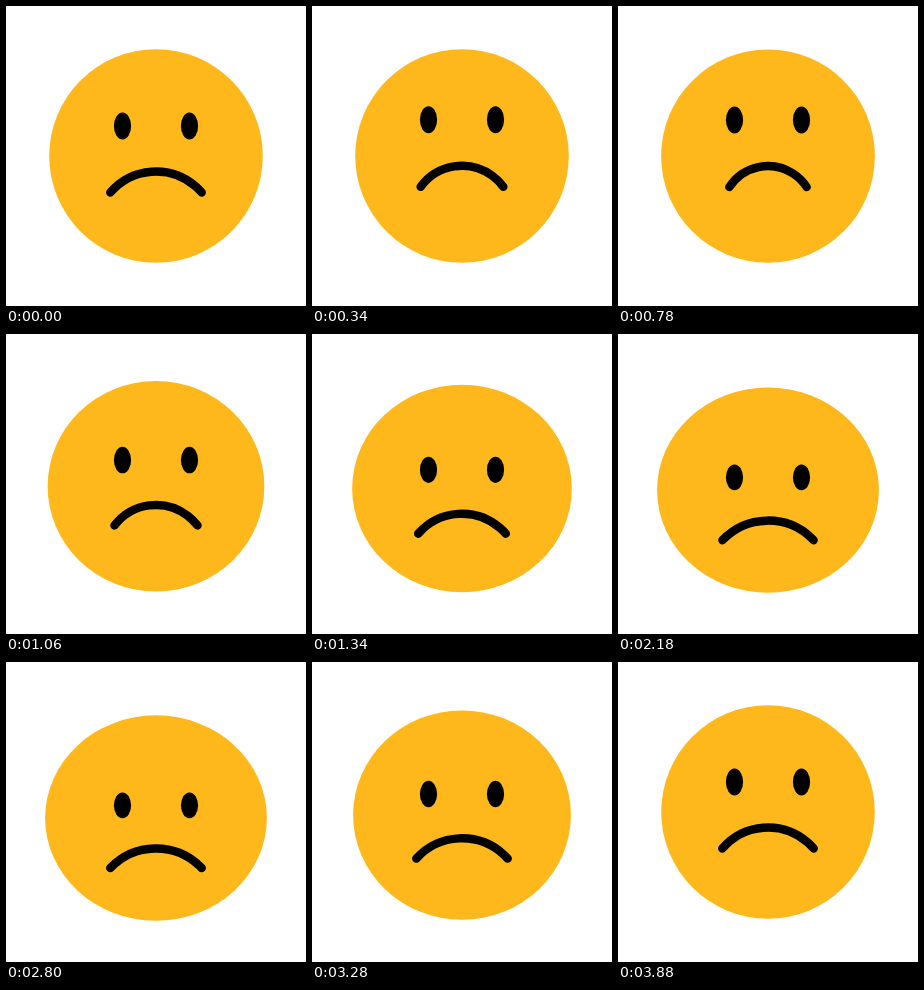
An HTML page with a canvas that plays this animation: 300x300 px, repeating every 4.4 s.

```html
<!DOCTYPE html>
<html lang="en">
<head>
<meta charset="utf-8">
<title>Sad face</title>
<style>
  html, body { margin: 0; width: 100%; height: 100%; overflow: hidden; background: #fff; }
  canvas { display: block; width: 300px; height: 300px; }
</style>
</head>
<body>
<canvas id="stage"></canvas>
<script>
const LOOP = 4400;
const STEP = 20;
const canvas = document.getElementById('stage');
const ctx = canvas.getContext('2d');
const dpr = window.devicePixelRatio || 1;
canvas.width = canvas.height = Math.round(300 * dpr);
ctx.scale(dpr, dpr);

const smooth = s => s * s * (3 - 2 * s);

// cubic-bezier(1/3, 0, 0, 1): quick start, long settling tail
function settle(x) {
  let lo = 0, hi = 1;
  for (let i = 0; i < 30; i++) {
    const s = (lo + hi) / 2;
    if (s * (1 - s) ** 2 + s ** 3 < x) lo = s; else hi = s;
  }
  return smooth((lo + hi) / 2);
}

function span(t, from, to, ease) {
  return ease(Math.min(1, Math.max(0, (t - from) / (to - from))));
}

function ellipse(x, y, rx, ry, color) {
  ctx.fillStyle = color;
  ctx.beginPath();
  ctx.ellipse(x, y, rx, ry, 0, 0, Math.PI * 2);
  ctx.fill();
}

// Circular arc through both mouth corners and its highest point
function mouth(half, top, end) {
  const h = end - top;
  const r = (half * half + h * h) / (2 * h);
  const a = Math.asin(half / r);
  ctx.strokeStyle = '#000';
  ctx.lineWidth = 8.5;
  ctx.lineCap = 'round';
  ctx.beginPath();
  ctx.arc(150, top + r, r, -Math.PI / 2 - a, -Math.PI / 2 + a);
  ctx.stroke();
}

function draw(t) {
  const lift = span(t, 0, 600, settle);
  const drop = span(t, 610, 2600, settle);
  const back = span(t, 2680, 3880, smooth);
  const squash = span(t, 650, 2580, settle) * (1 - back);
  const shift = (-7 * lift + 31 * drop) * (1 - back);
  const narrow = 7.3 * span(t, 0, 600, smooth) * (1 - drop);

  ctx.fillStyle = '#fff';
  ctx.fillRect(0, 0, 300, 300);
  ellipse(150, 150 + 6.2 * squash, 106.8 + 4.2 * squash, 106.8 - 4.2 * squash, '#ffb81c');
  for (const x of [116.5, 183.5]) {
    ellipse(x, 120 + shift, 8.6, 13.5 - 0.6 * squash, '#000');
  }
  const dy = 0.9 * shift;
  mouth(45.7 - narrow, 165.5 + dy, 186.5 + dy - 1.5 * squash);
}

const start = performance.now();
function tick() {
  const t = Math.max(0, performance.now() - start) % LOOP;
  draw(Math.floor(t / STEP) * STEP);
  requestAnimationFrame(tick);
}
tick();
</script>
</body>
</html>
```
